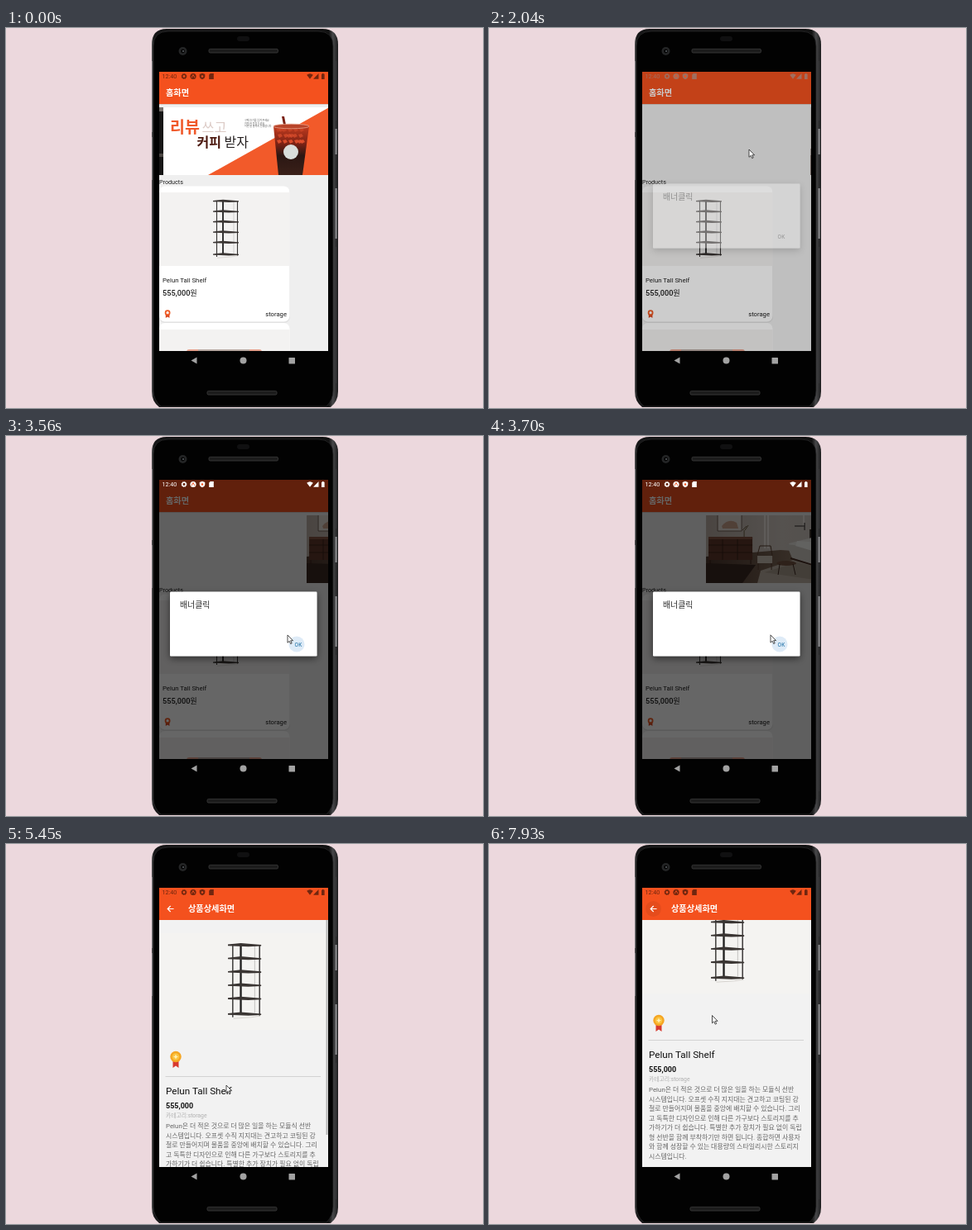
Write an HTML page that moves like this. It is 576 px wide and 460 px high and loops after 7.99 s.

```html
<!DOCTYPE html>
<html lang="ko">
<head>
<meta charset="utf-8">
<style>
  html, body { margin: 0; width: 100%; height: 100%; overflow: hidden; background: #ecd8dd; }
  svg { display: block; width: 576px; height: 460px; }
  text { font-family: Roboto, 'Noto Sans CJK KR', 'Noto Sans CJK', sans-serif; white-space: pre; }
</style>
</head>
<body>
<svg viewBox="0 0 576 460">
  <defs>
    <clipPath id="screen"><path d="M185 53H389V391H185Z"/></clipPath>
    <clipPath id="page"><path d="M0 0H204V82H0Z"/></clipPath>
    <clipPath id="body"><path d="M185 92H389V391H185Z"/></clipPath>
    <linearGradient id="rim">
      <stop offset="0" stop-color="#555"/><stop offset=".012" stop-color="#161617"/>
      <stop offset=".95" stop-color="#111"/><stop offset=".972" stop-color="#48484a"/>
      <stop offset="1" stop-color="#1c1c1d"/>
    </linearGradient>
    <linearGradient id="drink" x2="0" y2="1">
      <stop offset="0" stop-color="#c03a1e"/><stop offset=".35" stop-color="#7d2315"/>
      <stop offset=".6" stop-color="#2b1713"/><stop offset="1" stop-color="#3a2019"/>
    </linearGradient>
    <linearGradient id="wall">
      <stop offset="0" stop-color="#b9aca3"/><stop offset=".45" stop-color="#d6cdc6"/><stop offset="1" stop-color="#cbc4bd"/>
    </linearGradient>
    <linearGradient id="floor">
      <stop offset="0" stop-color="#4b352b"/><stop offset=".5" stop-color="#87715f"/><stop offset="1" stop-color="#5c4538"/>
    </linearGradient>
    <filter id="shadow" x="-20%" y="-30%" width="140%" height="170%">
      <feDropShadow dx="0" dy="3" stdDeviation="4" flood-opacity=".5"/>
    </filter>
    <g id="shelf" fill="none" stroke="#343231">
      <path d="M4.5 3V70M29.5 3V69" stroke-width="1.1"/>
      <path d="M12 2V67" stroke-width="1.8" stroke="#1f1e1e"/>
      <path d="M25 3V66" stroke-width=".4" stroke="#999"/>
      <g id="boards" fill="#3a3533" stroke="none"></g>
      <path d="M5 71.3L22 70L30 68.8" stroke="#d8d5d1" stroke-width=".8"/>
    </g>
  </defs>

  <!-- phone -->
  <path d="M176 20Q176 1 194 1H382Q401 1 401 20V440Q401 452 392 459H185Q176 452 176 440Z" fill="url(#rim)"/>
  <path d="M178 22Q178 4 196 4H377Q395 4 395 22V439Q395 450 387 458H187Q178 450 178 439Z" fill="#020202" stroke="#29292a" stroke-width=".8"/>
  <path d="M398.6 122V153M398.6 194V255" stroke="#8d8d8f" stroke-width="2"/>
  <path d="M398.6 40V112M398.6 265V430" stroke="#39393b" stroke-width="1"/>
  <path d="M176.5 40V126M176.5 132V184" stroke="#77777a"/>
  <rect x="279" y="10" width="15" height="6" rx="3" fill="#101011"/>
  <circle cx="213.5" cy="28" r="5" fill="#242526"/><circle cx="213.5" cy="28" r="2.4" fill="#050505"/>
  <circle cx="214" cy="28" r="1" fill="#5c6266"/>
  <g fill="#1c1c1c" stroke="#3d3d3d" stroke-width=".8">
    <rect x="245" y="25.4" width="83.500" height="4.600" rx="1.500"/>
    <rect x="243" y="439.400" width="84" height="4.600" rx="1.500"/>
  </g>
  <g fill="#a2a2a2">
    <path d="M223.500 402.500L230.500 398.500V406.500Z"/><circle cx="286.500" cy="402.500" r="4"/>
    <rect x="341.500" y="399" width="7.500" height="7.500" rx=".5"/>
  </g>

  <g clip-path="url(#screen)">
    <!-- home -->
    <rect x="185" y="53" width="204" height="338" fill="#efefef"/>
    <g id="strip">
      <rect x="-14" width="14" height="82" fill="#171616"/><rect x="-14" width="14" height="5" fill="#77716d"/>
      <path d="M-14 56H0V60H-14Z" fill="#4a4643"/>
      <g clip-path="url(#page)">
        <rect width="204" height="82" fill="#fff"/>
        <path d="M54 82L204 -2V82Z" fill="#f25a2a"/>
        <g font-weight="700">
          <text x="8" y="30.500" font-size="19.500" fill="#f0592a">리뷰</text>
          <text x="46.500" y="29.500" font-size="16.300" font-weight="300" fill="#dccbc6">쓰고</text>
          <text x="40.500" y="47.500" font-size="16" fill="#4d1a10">커피</text>
          <text x="73.500" y="47.500" font-size="16" font-weight="400" fill="#252020">받자</text>
        </g>
        <g font-size="3" fill="#555">
          <text x="98" y="17">구매 후기를 남겨 주세요</text><text x="98" y="20.500">커피 한 잔을 드려요</text>
          <text x="98" y="24">이번 달 말까지 진행합니다</text>
        </g>
        <path d="M143 11L146 11L149 26H146Z" fill="#7a2014"/>
        <path d="M133 23L176 23L168 82H139Z" fill="url(#drink)"/>
        <g id="ice" fill="#e2522f"></g>
        <ellipse cx="154.500" cy="23" rx="21.500" ry="2.800" fill="#b8442a" stroke="#e9a58f" stroke-width=".8"/>
        <circle cx="154" cy="54" r="9" fill="#d9dedb"/>
      </g>
      <g transform="translate(408)" clip-path="url(#page)">
        <rect width="204" height="82" fill="url(#wall)"/>
        <path d="M0 50L90 42L204 50V82H0Z" fill="url(#floor)"/>
        <path d="M0 82V58L60 60L44 82Z" fill="#3a2820"/>
        <path d="M14 -2H43V19H14Z" fill="#e4dcd5" stroke="#5d4a40" stroke-width=".8"/>
        <path d="M19 13Q27 3 37 9L39 16H20Z" fill="#c9a08a"/>
        <path d="M71 0V40M75 0V40M118 0V14" stroke="#eee8e3" stroke-width="2"/>
        <path d="M3 27H56V54H3Z" fill="#60382a"/><path d="M3 26H56V29H3Z" fill="#825341"/>
        <path d="M3 36H56M3 45H56M20 29V54M38 29V54M5 54V59M54 54V59" stroke="#3b2119"/>
        <path d="M46 26V18M44 18L49 13M47 18L51 12" stroke="#6c5c43"/>
        <path d="M66 67L108 53L166 66L140 82H62Z" fill="#bdb0a2"/>
        <path d="M70 69L110 57L150 66L130 78Z" fill="#a99b8d"/>
        <path d="M125 17H169V41H125Z" fill="#393029"/>
        <path d="M100 34L128 27L176 32V60L158 69L104 51Z" fill="#e9e6e1"/>
        <path d="M97 35L132 39L158 47V67L104 52Z" fill="#d2cdc7"/>
        <path d="M110 31L150 34L172 45L150 49L108 37Z" fill="#f7f5f2"/>
        <path d="M128 22H144V31H126ZM148 22H165L169 34H149Z" fill="#fbfaf8"/>
        <path d="M137 26H156L158 34H139Z" fill="#72796f"/>
        <path d="M102 52L158 69L176 60" fill="none" stroke="#493026" stroke-width="2"/>
        <path d="M178 39H204V64H178Z" fill="#563327"/><path d="M178 50H204" stroke="#2f1c16"/>
        <path d="M107 13H119M119 9V18M178 13H193M181 13V22M193 13V20" stroke="#2b2725"/>
        <path d="M179 36Q185 23 191 36Z" fill="#72764f"/>
        <path d="M62 49H80V58H62Z" fill="#cfc4b6"/><path d="M63 58V66M79 58V66M62 48L65 37H78L80 49" fill="none" stroke="#5b4030"/>
        <ellipse cx="97" cy="58" rx="12" ry="3" fill="#745340"/><path d="M89 59L87 72M105 59L108 72" stroke="#3c271d"/>
      </g>
    </g>
    <text x="185" y="189" font-size="7.200" fill="#222">Products</text>
    <rect x="185" y="192.500" width="158" height="164.500" rx="7" fill="#e1e1e1"/>
    <rect x="185" y="191.500" width="157.500" height="164" rx="7" fill="#fff"/>
    <rect x="185" y="199" width="157.500" height="89" fill="#f3f2f1"/>
    <use href="#shelf" x="250" y="207"/>
    <g fill="#1c1c1c">
      <text x="189" y="308" font-size="7.800">Pelun Tall Shelf</text>
      <text x="189" y="324" font-size="9.200" font-weight="500">555,000원</text>
      <text x="339" y="349" font-size="7.700" text-anchor="end">storage</text>
    </g>
    <path d="M192.800 346H197.400V351L195.100 349.500L192.800 351Z" fill="#d9441c"/>
    <circle cx="195.100" cy="344.700" r="2.500" fill="#fff" stroke="#ee5a24" stroke-width="1.800"/>
    <rect x="185" y="357" width="157.500" height="50" rx="7" fill="#fff"/>
    <rect x="185" y="365" width="157.500" height="40" fill="#f3f2f1"/>
    <rect x="218" y="389" width="91" height="6" rx="3" fill="#e5a08c"/>
    <rect x="232" y="389" width="62" height="4" fill="#b7a9a2"/>
    <rect x="185" y="53" width="204" height="39" fill="#f4511e"/>
    <path d="M185 92.500H389" stroke="#d9cfcb"/>
    <text x="193" y="82" font-size="10.200" font-weight="700" fill="#fff">홈화면</text>

    <!-- product detail -->
    <g id="detail">
      <rect x="185" y="53" width="204" height="338" fill="#f2f2f2"/>
      <g clip-path="url(#body)">
        <g id="scroll">
          <rect x="185" y="108" width="202" height="117" fill="#f4f3f1"/>
          <use href="#shelf" transform="translate(268 119) scale(1.295)"/>
          <path d="M201.500 261H208.500V271L205 268.500L201.500 271Z" fill="#d8392f"/>
          <circle cx="205" cy="257.500" r="6.700" fill="#f5a623"/><circle cx="205" cy="257.500" r="4.300" fill="#fbc441"/>
          <path d="M205 254.500L206 256.700L208 257.500L206 258.400L205 260.500L204 258.400L202 257.500L204 256.700Z" fill="#fff0b8"/>
          <path d="M192.500 281.500H380" stroke="#d2d2d2"/>
          <text x="193" y="302.500" font-size="11.700" fill="#111">Pelun Tall Shelf</text>
          <text x="193" y="319.500" font-size="9" font-weight="700" fill="#111">555,000</text>
          <text x="193" y="331.300" font-size="6.800" fill="#b0b0b0">카테고리:storage</text>
          <g id="description" font-size="7.900" fill="#666"></g>
        </g>
        <rect id="scrollbar" x="386.500" y="92" width="2" height="260" fill="#b5b5b5"/>
      </g>
      <rect x="185" y="53" width="204" height="39" fill="#f4511e"/>
      <circle id="backRipple" cx="198.500" cy="78.500" r="9.500" fill="#000"/>
      <path d="M202.500 78.500H195.500M198.700 75L195.200 78.500L198.700 82" fill="none" stroke="#fff" stroke-width="1.200"/>
      <text x="220" y="82" font-size="10.200" font-weight="700" fill="#fff">상품상세화면</text>
    </g>

    <rect id="dim" x="185" y="53" width="204" height="338"/>
    <g id="status">
      <text x="188.500" y="61.300" font-size="7.200">12:40</text>
      <circle cx="215" cy="58.500" r="2.200" fill="none" stroke="currentColor" stroke-width="1.500"/>
      <circle cx="215" cy="58.500" r="3" fill="none" stroke="currentColor" stroke-width=".8" stroke-dasharray="1.200 1.150"/>
      <circle cx="226" cy="58.500" r="3.600"/><path d="M224 60.200L226 56.500L228 60.200" fill="none" stroke="#f4511e" stroke-width=".9"/>
      <path d="M237 54.800L240.300 56V59Q240 61.300 237 62.300Q234 61.300 233.700 59V56Z"/><circle cx="237" cy="58.500" r="1.200" fill="#f4511e"/>
      <path d="M246.800 55H250.800V62H245.200V56.600Z"/>
      <path d="M363.200 56.700Q367 53.600 370.800 56.700L367 61.700Z"/><path d="M377.500 55V61.700H371Z"/>
      <path d="M381 55.700H382V54.900H383.500V55.700H384.600V62H381Z"/>
    </g>
    <g id="dialog">
      <rect x="198" y="188.500" width="177.500" height="78" rx="1.200" fill="#fff" filter="url(#shadow)"/>
      <text x="210" y="208" font-size="9.900" fill="#2a2a2a">배너클릭</text>
      <circle id="okRipple" cx="351" cy="252" r="9.500" fill="#deebf7"/>
      <text id="ok" x="348.500" y="255" font-size="6.500" letter-spacing=".4">OK</text>
    </g>
  </g>
  <path id="cursor" d="M0 0V9.300L2.200 7.400L3.700 10.700L5.200 10L3.700 6.800H6.600Z" fill="#fff" stroke="#222" stroke-width=".8"/>
</svg>
<script>
const $ = id => document.getElementById(id);
const LOOP = 7990;

// Repeated shapes
$('boards').innerHTML = [2, 14.5, 27, 39.5, 52, 66.5].map(y =>
  `<path d="M0 ${y}L12 ${y - 1.3}L31 ${y + .3}V${y + 1.5}L19 ${y + 2}L0 ${y + 1.2}Z"/>`).join('');
$('ice').innerHTML = Array.from({ length: 18 }, (_, i) => {
  const x = 136 + i * 13 % 32, y = 26 + i * 7 % 21;
  return `<path d="M${x} ${y}l4 -1l2 3l-4 2z" opacity="${.4 + i % 3 * .25}"/>`;
}).join('');
$('description').innerHTML = [
  'Pelun은 더 적은 것으로 더 많은 일을 하는 모듈식 선반',
  '시스템입니다. 오프셋 수직 지지대는 견고하고 코팅된 강',
  '철로 만들어지며 물품을 중앙에 배치할 수 있습니다. 그리',
  '고 독특한 디자인으로 인해 다른 가구보다 스토리지를 추',
  '가하기가 더 쉽습니다. 특별한 추가 장치가 필요 없이 독립',
  '형 선반을 함께 부착하기만 하면 됩니다. 종합하면 사용자',
  '와 함께 성장할 수 있는 대용량의 스타일리시한 스토리지',
  '시스템입니다.'
].map((line, i) => `<text x="193" y="${344 + i * 11.5}">${line}</text>`).join('');

// The screen refreshes in bursts: [first, last, steps]
const bursts = [[460, 1150, 10], [1350, 1350, 1], [1550, 1690, 3], [1840, 1840, 1], [2040, 2180, 3],
  [2440, 3210, 11], [3280, 4040, 12], [4170, 4370, 3], [4830, 5450, 9], [5780, 6550, 12],
  [6620, 7380, 12], [7450, 7930, 8]];

function refreshTime(t) {
  const burst = bursts.filter(b => b[0] <= t).pop();
  if (!burst) return 0;
  const [first, last, steps] = burst;
  if (t >= last) return last;
  const gap = (last - first) / (steps - 1);
  return first + Math.floor((t - first) / gap + 1e-6) * gap;
}

// Linear interpolation through [time, value] pairs
function track(t, ...keys) {
  const next = keys.findIndex(k => k[0] > t);
  if (next === 0) return keys[0][1];
  if (next < 0) return keys[keys.length - 1][1];
  const [t0, a] = keys[next - 1], [t1, b] = keys[next];
  return a + (b - a) * (t - t0) / (t1 - t0);
}

const set = (id, name, value) => $(id).setAttribute(name, value);
const fade = (id, value) => set(id, 'opacity', value);
const move = (id, x, y) => set(id, 'transform', `translate(${x} ${y})`);

function draw(now) {
  const t = refreshTime(now % LOOP);

  const offset = track(t, [0, -5], [460, -4], [600, 0], [950, 0], [1150, 22], [1350, 23], [1550, 176],
    [1620, 190], [1690, 197], [1840, 204.6], [3210, 204.6], [3350, 226], [3560, 230], [3760, 380], [3900, 402], [4040, 408]);
  move('strip', 185 - offset, 96);

  const dialog = track(t, [1970, 0], [2180, 1], [3760, 1], [4040, 0]);
  fade('dim', dialog * .6);
  fade('dialog', dialog);
  const pressed = track(t, [3270, 0], [3420, 1], [3900, 1], [4040, 0]);
  fade('okRipple', pressed);
  set('ok', 'fill', pressed > .5 ? '#1d6fa5' : '#444');

  const lit = track(t, [1970, 0], [2180, 1], [4040, 1], [4370, 0]);
  const mix = (dark, light) => Math.round(dark + (light - dark) * lit);
  const ink = `rgb(${mix(112, 255)},${mix(38, 255)},${mix(15, 255)})`;
  set('status', 'fill', ink);
  set('status', 'color', ink);

  const entered = track(t, [4980, 0], [5380, 1]);
  fade('detail', entered);
  move('detail', 0, 27 * (1 - entered) ** 2);
  const scrolled = track(t, [5780, 0], [5920, 6], [6340, 44]);
  move('scroll', 0, -scrolled);
  move('scrollbar', 0, scrolled * 299 / 343);
  fade('scrollbar', track(t, [6800, 1], [7150, 0]));
  fade('backRipple', track(t, [7150, 0], [7380, .12], [7930, .06]));

  move('cursor',
    track(t, [460, 300], [1150, 314], [2370, 314], [2650, 345], [3280, 345], [3490, 340], [3760, 340], [4040, 288.5],
      [4830, 288.5], [5300, 266], [5780, 266], [6550, 269], [6620, 269], [7050, 196], [7450, 196], [7930, 269.5]),
    track(t, [0, 470], [390, 470], [460, 450], [1150, 147], [2370, 147], [2650, 258], [3280, 258], [3490, 241], [4040, 240.5],
      [4830, 240.5], [5300, 292], [5780, 292], [6550, 207], [6620, 207], [7050, 77], [7450, 77], [7930, 207.5]));
  requestAnimationFrame(frame);
}

const start = performance.now();
function frame() { draw(performance.now() - start); }
frame();
</script>
</body>
</html>
```
